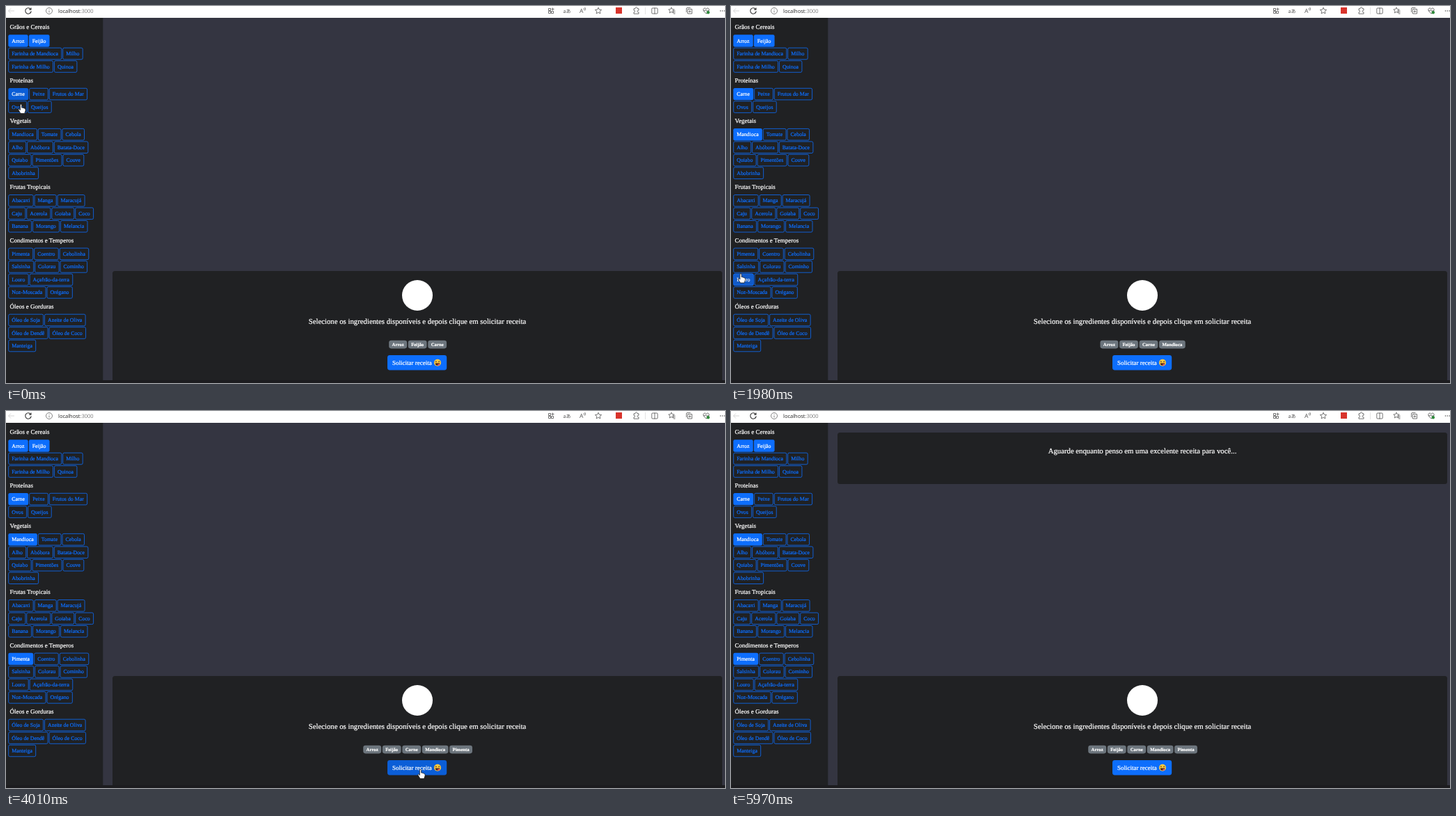
These frames come from a looping animation (1033 px wide and 542 px high, 8000 ms). An HTML page with a canvas:

```html
<!DOCTYPE html>
<html lang="pt-BR">
<head>
<meta charset="utf-8">
<title>Receitas</title>
<style>
  html, body { margin: 0; width: 100%; height: 100%; overflow: hidden; background: #343541; }
  canvas { display: block; width: 100%; height: 100%; }
</style>
</head>
<body>
<canvas id="stage" width="1033" height="542"></canvas>
<script>
const ctx = document.getElementById('stage').getContext('2d');
const W = 1033, H = 542, LOOP = 8000, CENTER = 591;
const SERIF = '"Liberation Serif", "Times New Roman", serif';
const SANS = '"Open Sans", "Noto Sans", sans-serif';
const BLUE = '#0d6efd', BLUE_HOVER = '#0b5ed7', DARK = '#202123', INK = '#555';

// Each section: title, then rows of buttons
const sections = [
  ['Grãos e Cereais', 'Arroz,Feijão', 'Farinha de Mandioca,Milho', 'Farinha de Milho,Quinoa'],
  ['Proteínas', 'Carne,Peixe,Frutos do Mar', 'Ovos,Queijos'],
  ['Vegetais', 'Mandioca,Tomate,Cebola', 'Alho,Abóbora,Batata-Doce', 'Quiabo,Pimentões,Couve', 'Abobrinha'],
  ['Frutas Tropicais', 'Abacaxi,Manga,Maracujá', 'Caju,Acerola,Goiaba,Coco', 'Banana,Morango,Melancia'],
  ['Condimentos e Temperos', 'Pimenta,Coentro,Cebolinha', 'Salsinha,Colorau,Cominho', 'Louro,Açafrão-da-terra', 'Noz-Moscada,Orégano'],
  ['Óleos e Gorduras', 'Óleo de Soja,Azeite de Oliva', 'Óleo de Dendê,Óleo de Coco', 'Manteiga']
];

// Pointer steps: time, x, y, hovered control
const steps = [
  [0, 22.5, 148, 'Carne'], [120, 21, 170, ''], [250, 22, 190, 'Mandioca'], [390, 22, 194, 'Mandioca'],
  [940, 27, 214, 'Abóbora'], [1070, 37, 245, 'Abobrinha'], [1200, 50, 285, 'Manga'],
  [1330, 54.5, 293, 'Manga'], [1460, 90, 306, 'Goiaba'], [1590, 137, 330, ''],
  [1720, 105, 359, 'Cebolinha'], [1850, 50, 379, 'Colorau'], [1980, 15, 391.5, 'Louro'],
  [2130, 20, 379, 'Salsinha'], [2250, 21, 376, 'Salsinha'], [2420, 22, 370, 'Pimenta'],
  [2550, 22, 369, 'Pimenta'], [2690, 22.5, 365.5, 'Pimenta'], [2940, 22.5, 366, 'Pimenta'],
  [3350, 200, 430, ''], [3480, 384, 497, ''], [3620, 500, 521, ''],
  [3750, 580, 526, 'send'], [3880, 596, 525, 'send'], [4010, 596.5, 522, 'send']
];
const POINTER_GONE = 5830, SEND_REST = 5970, ANSWER = 4290;

const hand = new Path2D('M-2.6-5.4q0-1.3 1.1-1.3q1.1 0 1.1 1.3V-1.8q1.6-.4 2 .5q1.6-.3 1.9.6q1.5 0 1.5 1.5V2.5L3.6 6.5H-2L-5 1.6q-.6-1.4.6-1.5L-2.6 1.6Z');

function setFont(size, weight = '', family = SERIF) {
  ctx.font = `${weight} ${size}px ${family}`;
}

// Serif text gets a hairline outline for a slightly heavier look
function text(s, x, y, size, color, align = 'left', weight = '', family = SERIF) {
  setFont(size, weight, family);
  ctx.textAlign = align;
  ctx.fillStyle = ctx.strokeStyle = color;
  ctx.fillText(s, x, y);
  if (family === SERIF) {
    ctx.lineWidth = 0.22;
    ctx.strokeText(s, x, y);
  }
}

function widthOf(s, size, weight) {
  setFont(size, weight);
  return ctx.measureText(s).width;
}

function box(x, y, w, h, r, fill) {
  ctx.beginPath();
  ctx.roundRect(x, y, w, h, r);
  ctx.fillStyle = fill;
  ctx.fill();
}

function line(path, color = INK, width = 0.8) {
  ctx.strokeStyle = color;
  ctx.lineWidth = width;
  ctx.stroke(new Path2D(path));
}

function disc(x, y, r, fill) {
  ctx.beginPath();
  ctx.arc(x, y, r, 0, Math.PI * 2);
  ctx.fillStyle = fill;
  ctx.fill();
}

function star(cx, cy, r) {
  let d = '';
  for (let i = 0; i < 10; i++) {
    const a = i * Math.PI / 5 - Math.PI / 2, q = i % 2 ? r * 0.48 : r;
    d += `${i ? 'L' : 'M'}${cx + q * Math.cos(a)} ${cy + q * Math.sin(a)}`;
  }
  line(d + 'Z');
}

function toolbar() {
  ctx.fillStyle = '#fff';
  ctx.fillRect(0, 0, W, 17);
  line('M12 7H3.5M7 3.5L3.5 7L7 10.5', '#ccc');
  line('M35.4 4.5A4.2 4.2 0 1 0 36.2 7.4M36 2.4V5.1H33.2', '#333', 1.1);
  line('M66.5 7A4.5 4.5 0 1 1 57.5 7A4.5 4.5 0 1 1 66.5 7M62 6.5V9.5M62 4.3V5.3', '#666');
  text('localhost', 75, 9.8, 7.5, '#222', 'left', '', SANS);
  text(':3000', 75 + ctx.measureText('localhost').width, 9.8, 7.5, '#777', 'left', '', SANS);

  line('M779.5 3.5h3v3h-3zM779.5 7.5h3v3h-3zM783.5 7.5h3v3h-3zM785.5 2.5v4M783.5 4.5h4');
  text('aあ', 806, 9.8, 7, INK, 'center', '', '"Noto Sans CJK JP", "Noto Sans CJK", sans-serif');
  text('A', 824, 10.3, 8.5, INK, 'left', '', SANS);
  line('M830 3.2q1.2 1 0 2.4M831.6 2q2 2 0 4.6');
  star(851, 7, 4.8);
  ctx.fillStyle = '#d8342c';
  ctx.fillRect(876, 2, 9, 9);
  line('M902 3.8h2q0-2 1.5-2t1.5 2h2v2.4q-2 0-2 1.4t2 1.4v2.2h-7v-2.2q1.6 0 1.6-1.4t-1.6-1.4z');
  line('M918.5 2V12', '#ddd');
  line('M929 3h6q1.2 0 1.2 1v6q0 1-1.2 1h-6q-1.2 0-1.2-1v-6q0-1 1.2-1M932 2.5V11.5');
  star(956, 6.4, 4.4);
  line('M957.5 7h4M958.5 9h3M959 11h2.5');
  line('M977.5 9V4q0-1.5 1.5-1.5h4.5M979.5 4.5h6v6.5h-6zM982.5 6v3.5M980.8 7.8h3.5');
  line('M1006 11L1002.2 7Q1001 4.5 1003 3.2Q1005 2.5 1006 4.3Q1007 2.5 1009 3.2Q1011 4.5 1009.8 7ZM1002 6.8h2.5l1-1.5l1.5 2.5l.8-1h2');
  disc(1008.8, 9.3, 2.2, '#2f8a3c');
  for (let i = 0; i < 3; i++) disc(1026.5 + i * 2.8, 7, 0.8, INK);
}

function button(label, x, cy, chosen, hover) {
  const w = widthOf(label, 7.875) + 10.1, h = 17.4, y = cy - h / 2;
  if (chosen) {
    box(x, y, w, h, 2.25, hover ? BLUE_HOVER : BLUE);
  } else {
    ctx.globalAlpha = hover;
    box(x, y, w, h, 2.25, BLUE);
    ctx.globalAlpha = 1;
    const edge = 0.8;
    ctx.beginPath();
    ctx.roundRect(x + edge / 2, y + edge / 2, w - edge, h - edge, 1.9);
    ctx.strokeStyle = BLUE;
    ctx.lineWidth = edge;
    ctx.stroke();
  }
  text(label, x + 4.9, cy + 2.5, 7.875, chosen || hover ? '#fff' : BLUE);
  return w;
}

function sidebar(chosen, target, strength) {
  ctx.fillStyle = DARK;
  ctx.fillRect(0, 17, 139.3, H - 17);
  let y = 30.3;
  for (const [title, ...rows] of sections) {
    text(title, 5.5, y + 2.8, 9, '#fff');
    y += 19.7;
    rows.forEach((row, i) => {
      let x = 3.3;
      for (const name of row.split(',')) {
        x += button(name, x, y + i * 18.5, chosen.includes(name), name === target ? strength : 0) + 1.1;
      }
    });
    y += (rows.length - 1) * 18.5 + 19.9;
  }
}

function badges(names) {
  const size = 6.75, gap = 1.7;
  const widths = names.map(n => widthOf(n, size, 'bold') + 8.8);
  let x = CENTER + 0.6 - (widths.reduce((a, b) => a + b) + gap * (names.length - 1)) / 2;
  names.forEach((name, i) => {
    box(x, 480.8, widths[i], 11.6, 3.3, '#6c757d');
    text(name, x + 4.4, 488.8, size, '#fff', 'left', 'bold');
    x += widths[i] + gap;
  });
}

function emoji(x, y) {
  disc(x, y, 5, '#ffc83d');
  line(`M${x - 3.4} ${y - 1}q1.1-1.8 2.2 0M${x + 1.2} ${y - 1}q1.1-1.8 2.2 0`, '#33241a', 1);
  ctx.beginPath();
  ctx.arc(x, y + 0.7, 3.2, 0, Math.PI);
  ctx.fillStyle = '#4a2517';
  ctx.fill();
  box(x + 0.2, y + 1.6, 2.6, 2.5, 1.2, '#f2526b');
}

function main(t, chosen, hover) {
  if (t >= ANSWER) {
    box(153, 31, 876, 74, 3.5, DARK);
    text('Aguarde enquanto penso em uma excelente receita para você...', CENTER, 60.5, 10.75, '#fff', 'center');
  }
  box(153, 381, 876, H - 381, [3.5, 3.5, 0, 0], DARK);
  disc(CENTER, 416, 22, '#fff');
  text('Selecione os ingredientes disponíveis e depois clique em solicitar receita', CENTER, 456.5, 10.75, '#fff', 'center');
  badges(chosen);
  box(548, 502.1, 85.2, 21.4, 3.4, hover ? BLUE_HOVER : BLUE);
  text('Solicitar receita', 555, 515.8, 9, '#fff');
  emoji(620, 512.8);
}

function pointer(x, y) {
  ctx.save();
  ctx.translate(x + 0.5, y);
  ctx.lineJoin = 'round';
  ctx.fillStyle = '#fff';
  ctx.fill(hand);
  ctx.strokeStyle = '#111';
  ctx.lineWidth = 0.7;
  ctx.stroke(hand);
  ctx.restore();
}

function draw(t) {
  const at = steps.findLastIndex(s => s[0] <= t);
  const [, x, y, over] = steps[at];
  const target = t >= SEND_REST ? '' : over;
  // A control fills partly on entry, fully one step later
  const entering = at > 0 && steps[at - 1][3] !== over && t - steps[at][0] < 130;
  const chosen = ['Arroz', 'Feijão', 'Carne'];
  if (t >= 790) chosen.push('Mandioca');
  if (t >= 3090) chosen.push('Pimenta');

  ctx.fillStyle = '#343541';
  ctx.fillRect(0, 0, W, H);
  toolbar();
  sidebar(chosen, target, entering ? 0.75 : 1);
  main(t, chosen, target === 'send');
  ctx.fillStyle = '#1c1c1f';
  ctx.fillRect(0, 538, W, H - 538);
  if (t < POINTER_GONE) pointer(x, y);
}

ctx.textRendering = 'geometricPrecision';
ctx.lineJoin = 'round';
const start = performance.now();
function tick() {
  draw(Math.max(0, performance.now() - start) % LOOP);
  requestAnimationFrame(tick);
}
tick();
</script>
</body>
</html>
```
